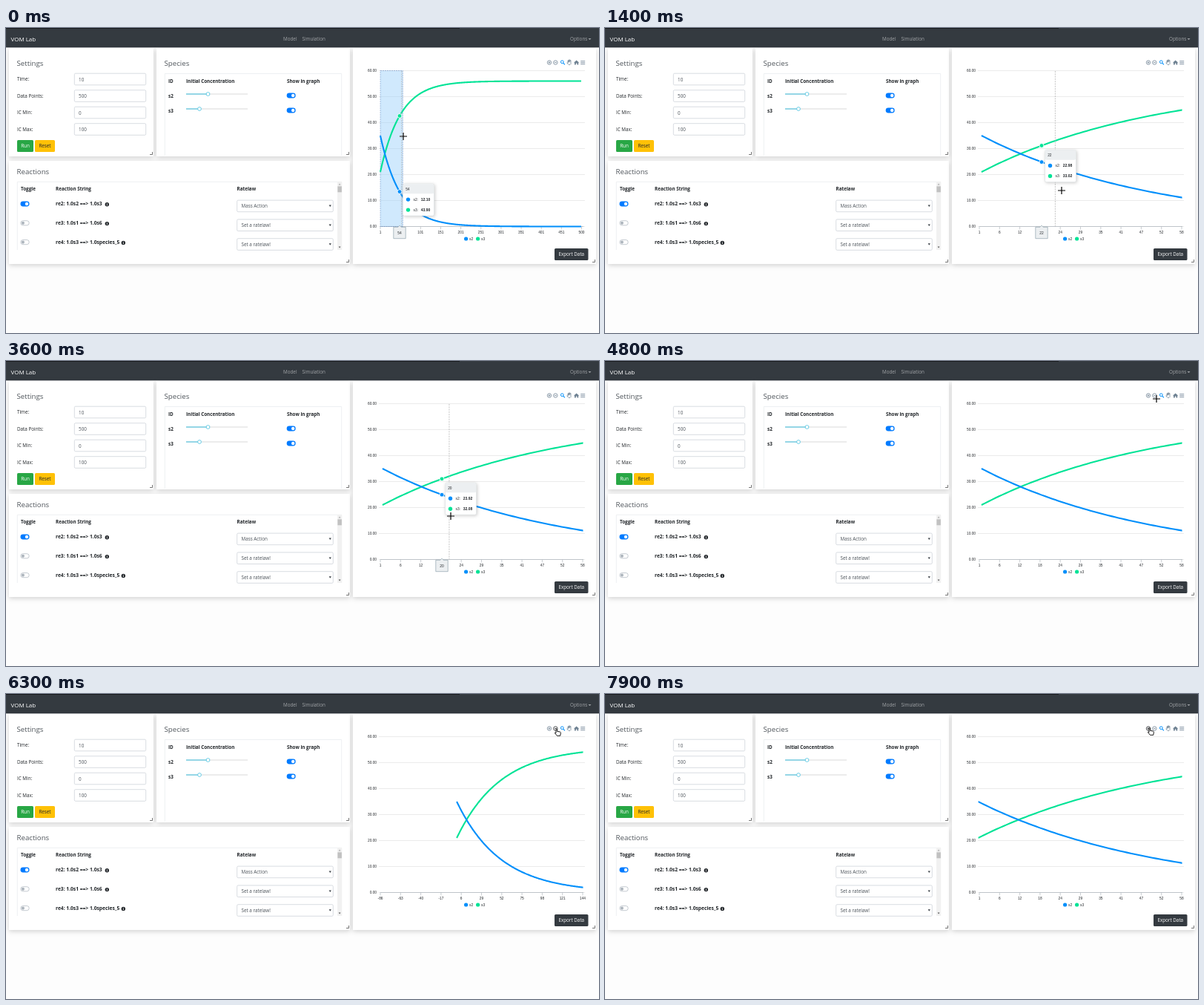
Recreate the animation shown at these times as an HTML page. Size 800 by 411 pixels, loop 8 s.

```html
<!DOCTYPE html>
<html lang="en">
<head>
<meta charset="utf-8">
<title>Simulation</title>
<style>
html, body { margin: 0; width: 100%; height: 100%; overflow: hidden; background: #fdfdfd; }
svg { display: block; width: 800px; height: 411px; font: 6.3px "Open Sans", "Noto Sans", sans-serif; }
.card { fill: #fff; filter: drop-shadow(0 2.5px 3px rgba(0, 0, 0, .17)); }
.chart { font-family: "Liberation Sans", Arial, sans-serif; font-size: 4.8px; }
</style>
</head>
<body>
<svg viewBox="0 0 800 411">
  <clipPath id="plot"><rect x="503.5" y="50" width="275" height="220"/></clipPath>
  <g id="page"></g>
  <g id="live" class="chart"></g>
</svg>
<script>
const BLUE = '#008ffb', GREEN = '#00e396', DARK = '#343a40', INK = '#212529';
const LOOP = 8000, STEP = 100, MORPH = 380, LAG = 100;

const text = (x, y, s, attr = '') => `<text x="${x}" y="${y}" fill="${INK}" ${attr}>${s}</text>`;
const bold = (x, y, s, size = 6.3) => text(x, y, s, `font-weight="700" font-size="${size}"`);
const rect = (x, y, w, h, fill, attr = '') =>
  `<rect x="${x}" y="${y}" width="${w}" height="${h}" fill="${fill}" ${attr}/>`;
const dot = (x, y, r, fill, attr = '') => `<circle cx="${x}" cy="${y}" r="${r}" fill="${fill}" ${attr}/>`;
const path = (d, stroke, width = 1, attr = '') =>
  `<path d="${d}" fill="none" stroke="${stroke}" stroke-width="${width}" ${attr}/>`;

const card = (x, y, w, h) => rect(x, y, w, h, '#fff', 'class="card"') +
  path(`M${x + w - 5} ${y + h - 2.5}h3.5v-3.5`, '#555', .8);
const title = (x, y, s) => text(x, y, s, 'font-size="9.7" style="fill:#50565c"');
const field = (x, y, w, s) => rect(x, y, w, 15.6, '#fff', 'rx="1.5" stroke="#ced4da" stroke-width=".8"') +
  text(x + 5.8, y + 10.3, s, 'style="fill:#495057"');
const button = (x, y, w, fill, ink, s) => rect(x, y, w, 16, fill, 'rx="1.6"') +
  text(x + w / 2, y + 10.4, s, `text-anchor="middle" style="fill:${ink}"`);
const toggle = (x, y, on) => on
  ? rect(x, y - 3.4, 12, 6.8, '#007bff', 'rx="3.4"') + dot(x + 8.5, y, 2.2, '#fff')
  : rect(x + .3, y - 3.1, 11.4, 6.2, '#fff', 'rx="3.1" stroke="#adb5bd" stroke-width=".7"') + dot(x + 3.4, y, 2.1, '#adb5bd');
const slider = (y, thumb) => path(`M243 ${y}H326`, '#d9d9d9', 1.2) + path(`M243 ${y}H${thumb}`, '#5bc8e2', 1.2) +
  dot(thumb, y, 2.4, '#fff', 'stroke="#5bc8e2" stroke-width=".9"');

function pageMarkup() {
  let s = rect(0, 0, 800, 26.3, DARK) + rect(0, 0, 612, 1, '#16191c');
  s += text(6.5, 18, 'VOM Lab', 'font-size="8" style="fill:#fff"');
  [[374, 'Model'], [399.5, 'Simulation'], [761, 'Options']].forEach(([x, w]) =>
    s += text(x, 17.4, w, 'style="fill:#a2a5a8"'));
  s += '<path d="M785.5 14h4l-2 2z" fill="#a2a5a8"/>';

  s += card(4, 27, 195, 146) + title(14.5, 51, 'Settings');
  [['Time:', 10], ['Data Points:', 500], ['IC Min:', 0], ['IC Max:', 100]].forEach(([label, v], i) => {
    const y = 61.2 + i * 22.5;
    s += text(15, y + 10, label) + field(92.3, y, 96.4, v);
  });
  s += button(15, 151, 22, '#28a745', '#fff', 'Run') + button(39, 151, 27, '#ffc107', INK, 'Reset');

  s += card(203, 27, 261, 146) + title(213.5, 51, 'Species');
  s += path('M214.3 172V61.5H452.7V172', '#e9ecef', .8);
  s += bold(219, 73.5, 'ID') + bold(243, 73.5, 'Initial Concentration') + bold(379, 73.5, 'Show in graph');
  [['s2', 272.5], ['s3', 261]].forEach(([name, thumb], i) => {
    const y = 89 + i * 20;
    s += bold(219, y + 4.5, name) + slider(y, thumb) + toggle(378.7, y + 2, true);
  });

  s += card(4, 179, 460, 139) + title(14.5, 197, 'Reactions');
  s += path('M15.3 299V207.3H453', '#e9ecef', .8);
  s += bold(20, 219.3, 'Toggle') + bold(67, 219.3, 'Reaction String') + bold(311.5, 219.3, 'Ratelaw');
  [['re2: 1.0s2 ==> 1.0s3', 136, 'Mass Action'], ['re3: 1.0s1 ==> 1.0s6', 136, 'Set a ratelaw!'],
   ['re4: 1.0s3 ==> 1.0species_5', 158, 'Set a ratelaw!']].forEach(([r, x, law], i) => {
    const y = 237 + i * 25.8;
    s += toggle(19.5, y, !i) + bold(67, y + 2.4, r.replace('>', '&gt;'), 6.7);
    s += dot(x + .3, y + .8, 2.7, INK) + path(`M${x + .3} ${y + .4}v2M${x + .3} ${y - 1}v.8`, '#fff', .9);
    s += field(311.7, y - 4.9, 129.6, law) + `<path d="M435.7 ${y + 1.6}h3.2l-1.6 2.5z" fill="${DARK}"/>`;
  });
  s += rect(447, 207, 6.3, 92, '#f1f1f1') + rect(447.4, 213.3, 5.5, 8, '#c1c1c1');
  s += '<path d="M448.7 211.5h2.8l-1.4-2z" fill="#aaa"/><path d="M448.7 294.5h2.8l-1.4 2z" fill="#555"/>';

  s += card(468, 27, 328, 291) + button(740, 297, 45.5, DARK, '#fff', 'Export Data');
  s += '<g class="chart">';
  for (let v = 0; v <= 60; v += 10) {
    const y = 267.5 - 3.5 * v;
    s += text(500, y + 1.3, v.toFixed(2), 'text-anchor="end"') + path(`M503 ${y}H781`, '#e2e2e2', .7);
  }
  s += dot(620.6, 284, 2.6, BLUE) + text(625, 285.6, 's2') + dot(636.6, 284, 2.6, GREEN) + text(641, 285.6, 's3');
  return s + '</g>';
}

// Each view: start time, pixel of data point 1, pixels per point, axis labels
const around = (time, k, lo, hi) => ({ time, k, p: 641.5 - 28.2 * k, lo, hi, gap: 27.3 });
const full = { time: -9999, p: 505, k: .543, lo: 1, hi: 501, gap: 27.15 };
const views = [full, around(600, 4.737, .6, 58), around(5000, 2.37, -28, 86), around(5700, 1.184, -86, 144),
  around(7100, 2.37, -28, 86), around(7450, 4.9, .6, 58)];

// Cursor: time, x, y
const track = [[-100, 531, 146], [0, 536, 146], [1000, 536, 146], [1200, 562, 180], [1300, 589, 206], [1360, 606, 215],
  [1400, 616, 219], [1600, 640, 220], [1750, 640, 218], [2100, 596, 213], [2200, 587, 212], [2300, 564, 211],
  [2450, 559, 211], [3000, 559, 211], [3300, 568, 211], [3500, 588, 210], [3560, 597, 209], [3600, 600, 209],
  [3700, 622, 190], [3800, 645, 160], [4100, 695, 95], [4400, 735, 58], [4700, 744, 51], [6500, 744, 51],
  [6700, 736, 50], [8000, 736, 50]];

function cursorAt(t) {
  const i = Math.max(1, track.findIndex(a => a[0] >= t));
  const [t0, x0, y0] = track[i - 1], [t1, x1, y1] = track[i];
  const f = (t - t0) / (t1 - t0);
  return [x0 + (x1 - x0) * f, y0 + (y1 - y0) * f];
}

const decay = n => 35 * Math.exp(-(n - 1) * 10 / 499);
const series = [['s2', BLUE, decay], ['s3', GREEN, n => 56 - decay(n)]];
const yOf = v => 267.5 - 3.5 * v;

function axis(v) {
  let s = path('M505 267.5H779', '#b4bac0', .8);
  for (let i = 0; i <= 10; i++) {
    const x = 505 + i * v.gap, n = Math.min(500, Math.round(v.lo + (v.hi - v.lo) * i / 10));
    s += path(`M${x} 267.5v4`, '#b4bac0', .7) + text(x, 277.2, n, 'text-anchor="middle"');
  }
  return s;
}

function curves(t, i) {
  const to = views[i], from = views[i - 1] || to;
  const u = Math.min(1, (t - to.time) / MORPH), e = (1 - Math.cos(Math.PI * u)) / 2;
  const p = from.p + (to.p - from.p) * e, k = from.k + (to.k - from.k) * e;
  return '<g clip-path="url(#plot)">' + [...series].reverse().map(([, color, f]) => {
    let d = '';
    for (let n = 1; n <= 500; n++) d += (d ? 'L' : 'M') + (p + k * (n - 1)).toFixed(2) + ' ' + yOf(f(n)).toFixed(2);
    return path(d, color, 2.1);
  }).join('') + '</g>';
}

function tooltip(t, v) {
  const dataAt = x => 1 + (x - v.p) / v.k;
  const n = Math.max(1, Math.round(dataAt(cursorAt(t - 40)[0])));
  const x = cursorAt(t - LAG)[0], at = dataAt(x), cross = v.p + (n - 1) * v.k;
  const left = x + 4.5, top = yOf(decay(at)) - (v === full ? 10.5 : 16);
  let s = path(`M${cross} 58V267`, '#b6b6b6', .8, 'stroke-dasharray="2 1.3"');
  series.forEach(([, c, f]) => s += dot(x, yOf(f(at)), 2.9, c, 'stroke="#fff" stroke-width=".9"'));
  s += `<path d="M${x - 8.2} 268.3h6l2.2-2.2 2.2 2.2h6v15.4h-16.4z" fill="#eceff1" stroke="#90a4ae" stroke-width=".7"/>`;
  s += text(x, 277.7, n, 'text-anchor="middle"');
  s += `<g transform="translate(${left} ${top})">` +
    rect(0, 0, 42, 43, '#fff', 'rx="2" stroke="#dfe2e4" stroke-width=".7" style="filter:drop-shadow(1px 1px 2px #0003)"') +
    rect(.3, .3, 41.4, 12.8, '#eceff1', 'rx="1.8"') + text(3.7, 8.5, n);
  series.forEach(([name, c, f], i) => {
    const y = 21 + 14 * i;
    s += dot(7, y, 2.7, c) + text(14, y + 1.8, name + ':') + bold(24.3, y + 1.8, f(n).toFixed(2), 5);
  });
  return s + '</g>';
}

function toolbar(hot) {
  const gray = '#6e8192', tone = i => hot === i ? INK : gray;
  let s = dot(733, 46.5, 2.7, 'none', `stroke="${tone(0)}" stroke-width=".8"`) + path('M731.5 46.5h3M733 45v3', tone(0), .7);
  s += dot(741.3, 46.5, 2.7, 'none', `stroke="${tone(1)}" stroke-width=".8"`) + path('M739.8 46.5h3', tone(1), .7);
  s += dot(750.3, 45.7, 1.9, 'none', `stroke="${BLUE}" stroke-width="1"`) + path('M751.7 47.1l2.2 2.2', BLUE, 1.1);
  s += path('M758 48.5l-1.2-1.7 1.5.4v-3 1.8-2.6h1.3v2.3-2.8h1.2v2.8-2.2h1.2v5l-1 1h-2z', gray, .7);
  s += `<path d="M766 46.8l3.6-3.3 3.6 3.3h-1v2.7h-1.8v-2h-1.6v2h-1.8v-2.7z" fill="${gray}"/>`;
  return s + path('M775.2 44.6h6M775.2 46.6h6M775.2 48.6h6', gray, .8);
}

const plus = (x, y) => path(`M${x - 5} ${y}h10M${x} ${y - 5}v10`, '#fff', 2.2, 'opacity=".6"') +
  path(`M${x - 5} ${y}h10M${x} ${y - 5}v10`, '#000', 1.2);
const hand = (x, y) => `<path transform="translate(${x - 2} ${y - 4.5})" d="M0 .8q.8-1 1.6 0v3l4 .8q1 .4.8 1.6l-.7 3.6H1.4L-1.7 6q.2-1 1.7 0z"
  fill="#fff" stroke="#000" stroke-width=".9" stroke-linejoin="round"/>`;

function draw(t) {
  const i = views.findLastIndex(v => v.time <= t), v = views[i];
  const [x, y] = cursorAt(t), pointing = t >= 4900;
  let s = axis(v) + toolbar(!pointing ? -1 : x < 740 ? 0 : 1);
  if (v === full) s += rect(505, 57.5, 30.3, 210, '#90caf9', 'fill-opacity=".42" stroke="#0d47a1" stroke-opacity=".45" stroke-width=".7" stroke-dasharray="2 1"');
  s += curves(t, i);
  if (v === full || t >= 1100 && y > 57) s += tooltip(t, v);
  live.innerHTML = s + (pointing ? hand : plus)(x, y);
}

const live = document.getElementById('live');
document.getElementById('page').innerHTML = pageMarkup();
const start = performance.now();
let last = -1;
function tick() {
  const t = Math.floor((performance.now() - start) % LOOP / STEP) * STEP;
  if (t !== last) draw(last = t);
  requestAnimationFrame(tick);
}
tick();
</script>
</body>
</html>
```
